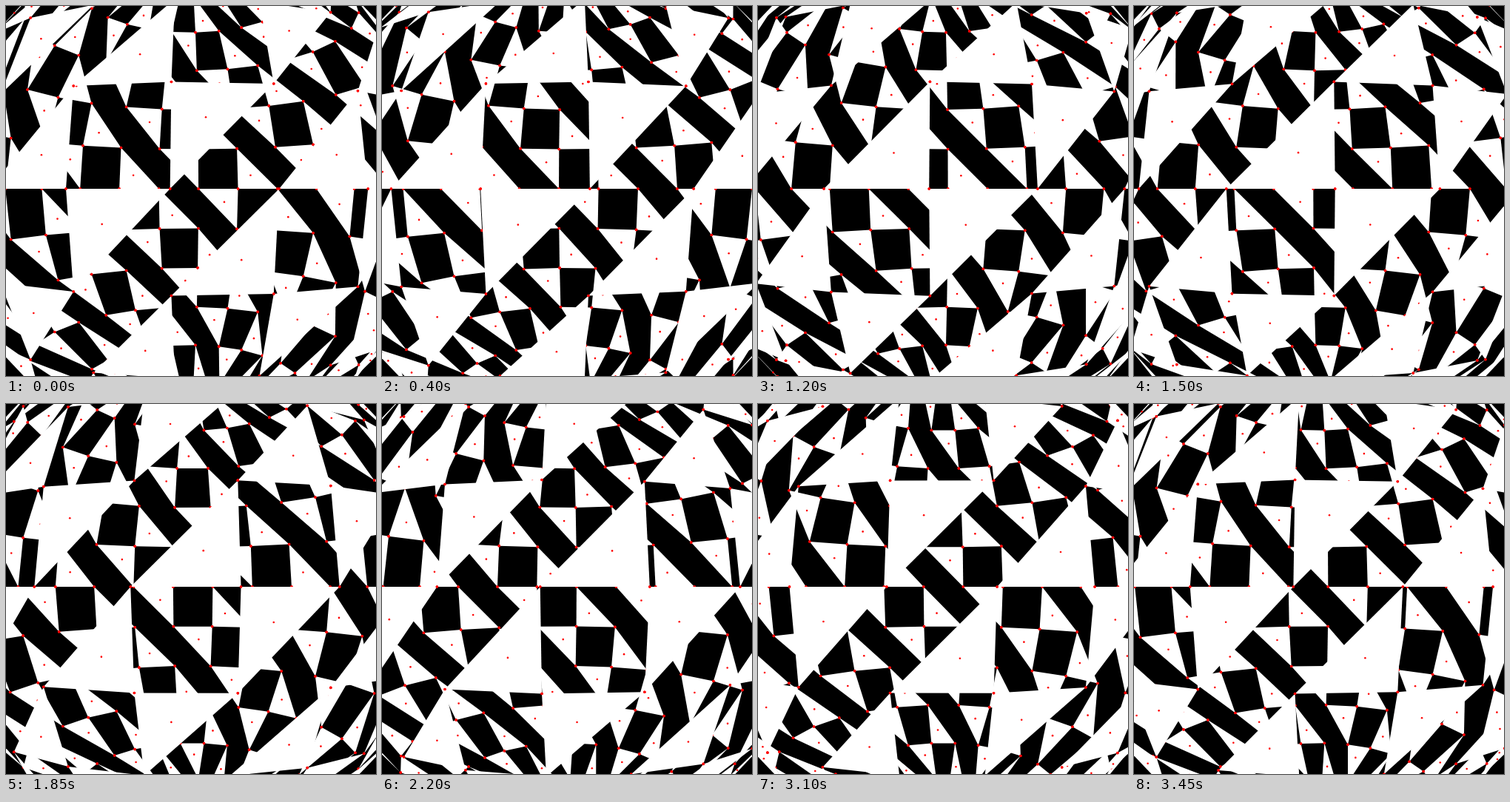
An HTML page with a canvas for the animation above (3500 ms loop, 500 by 500 pixels).

```html
<!DOCTYPE html>
<html>
<head>
<meta charset="utf-8">
<style>
html, body { margin: 0; width: 100%; height: 100%; overflow: hidden; background: #000; }
canvas { display: block; }
</style>
</head>
<body>
<canvas id="stage" width="500" height="500"></canvas>
<script>
const SIZE = 500, LOOP = 3500, STEP = 50;
const CX = 250, CY = 247, FOCAL = 634, DISTANCE = 2.1;
const COLS = 24, ROWS = 12, CELL = 2 * Math.PI / COLS;
const FIRST_COL = .812;

// Slightly uneven spin: [time in ms, share of the loop]
const SPIN = [[0, 0], [400, .131], [900, .265], [1500, .444],
  [2200, .649], [2750, .799], [3450, .986], [3500, 1]];

const ctx = document.getElementById('stage').getContext('2d');

// White triangles on the sphere, corners as [column, row]; the other tiles are open
const triangles = [];
for (let row = -ROWS / 2; row < ROWS / 2; row++) {
  for (let col = 0; col < COLS; col++) {
    const kind = (col + row + ROWS) % 3;
    if (kind === 1) triangles.push([[col, row], [col + 1, row], [col, row + 1]]);
    if (kind === 2) triangles.push([[col + 1, row], [col + 1, row + 1], [col, row + 1]]);
  }
}

function onSphere([col, row], turn) {
  const lon = (col + turn) * CELL, lat = row * CELL;
  return [Math.sin(lon) * Math.cos(lat), Math.sin(lat), Math.cos(lon) * Math.cos(lat)];
}

function project([x, y, z]) {
  const scale = FOCAL / (DISTANCE - z);
  return [CX + x * scale, CY + y * scale];
}

const centroid = points => [0, 1, 2].map(k => (points[0][k] + points[1][k] + points[2][k]) / 3);

function facesCamera([a, b, c]) {
  return (b[0] - a[0]) * (c[1] - a[1]) > (b[1] - a[1]) * (c[0] - a[0]);
}

function dot([x, y], radius) {
  ctx.beginPath();
  ctx.arc(x, y, radius, 0, 2 * Math.PI);
  ctx.fill();
}

function drawLayer(faces) {
  ctx.fillStyle = '#fff';
  for (const { corners } of faces) {
    ctx.beginPath();
    for (const [x, y] of corners) ctx.lineTo(x, y);
    ctx.fill();
  }
  ctx.fillStyle = '#f00';
  for (const { corners, middle } of faces) {
    for (const corner of corners) dot(corner, 1.8);
    dot(middle, 1.3);
  }
}

function progress(time) {
  const n = SPIN.findIndex(key => key[0] > time);
  const [t0, p0] = SPIN[n - 1], [t1, p1] = SPIN[n];
  return p0 + (p1 - p0) * (time - t0) / (t1 - t0);
}

function draw(time) {
  const turn = FIRST_COL + 3 * progress(time);
  const faces = triangles.map(triangle => {
    const points = triangle.map(p => onSphere(p, turn));
    return { corners: points.map(project), middle: project(centroid(points)) };
  });
  ctx.fillStyle = '#000';
  ctx.fillRect(0, 0, SIZE, SIZE);
  drawLayer(faces.filter(face => !facesCamera(face.corners)));
  drawLayer(faces.filter(face => facesCamera(face.corners)));
}

const start = performance.now();
function tick() {
  const time = (performance.now() - start) % LOOP;
  draw(Math.floor(time / STEP) * STEP);
  requestAnimationFrame(tick);
}
tick();
</script>
</body>
</html>
```
